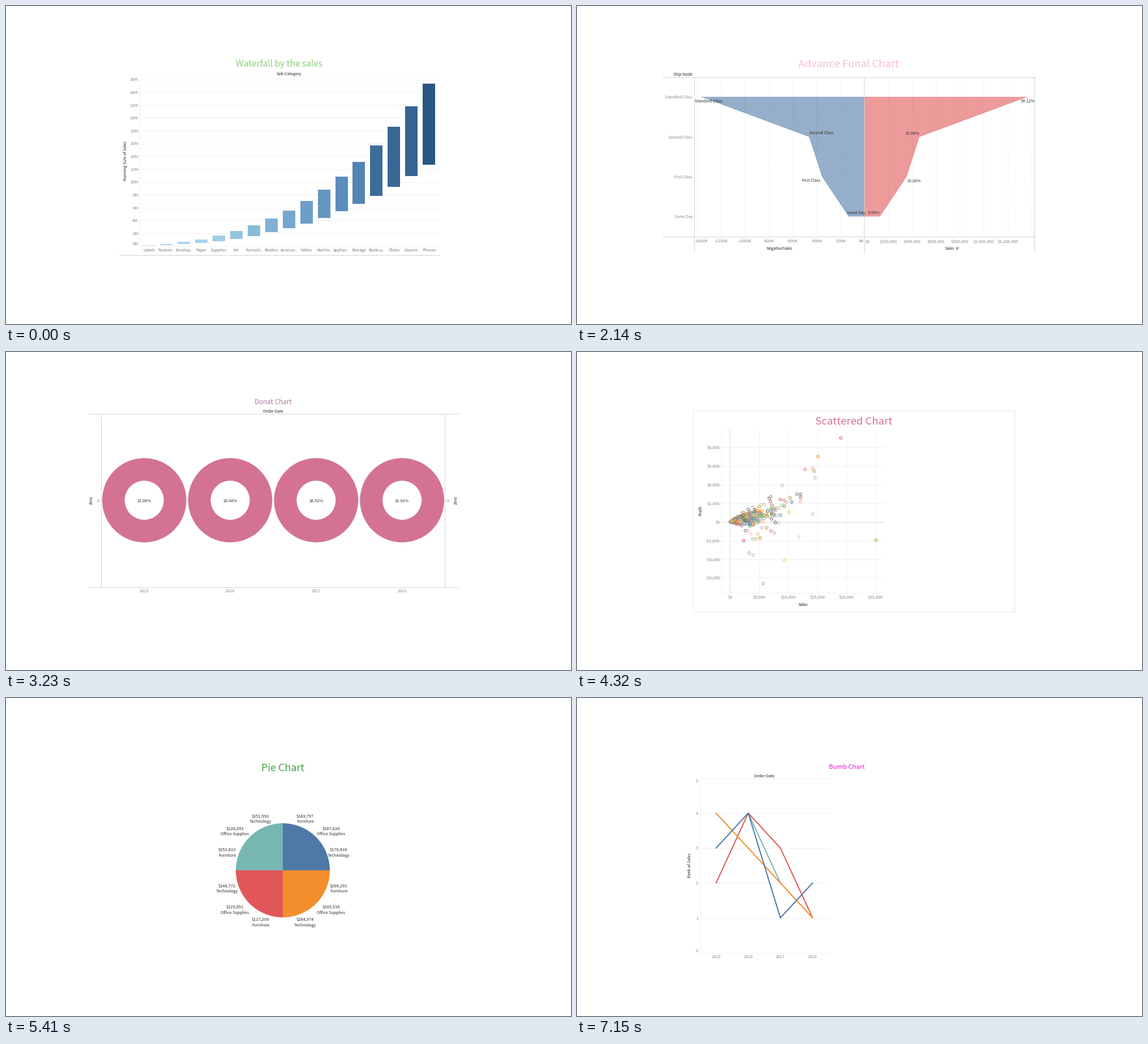
A matplotlib script for the animation above (7.59 s loop, 998 px wide and 561 px high).

```python
import numpy as np
import matplotlib.pyplot as plt
from matplotlib.animation import FuncAnimation
from matplotlib.collections import PatchCollection
from matplotlib.colors import LinearSegmentedColormap
from matplotlib.patches import Circle, Polygon, Rectangle, Wedge

W, H, DPI = 998, 561, 64
INTERVAL, LOOP = 30, 7590
SLIDE, LEAD = 1090, 40  # each slide lasts 1090 ms, the first one is 40 ms shorter

PT = 72 / DPI
DARK, INK, GREY = "#1c1c1c", "#2b2b2b", "#8a8a8a"
GRID, RULE = "#f0f0f0", "#d4d4d4"
PALETTE = dict(
    blue="#4e79a7", sky="#a0cbe8", orange="#f28e2b", peach="#ffbe7d",
    green="#59a14f", lime="#8cd17d", gold="#b6992d", yellow="#f1ce63",
    teal="#499894", mint="#86bcb6", red="#e15759", salmon="#ff9d9a",
    slate="#79706e", stone="#bab0ac", rose="#d37295", blush="#fabfd2",
    plum="#b07aa1", lilac="#d4a6c8", brown="#9d7660", sand="#d7b5a6")
SHADES = list(PALETTE.values())
AQUA = "#76b7b2"

plt.rcParams["font.family"] = ["Noto Sans CJK JP", "DejaVu Sans"]
fig = plt.figure(figsize=(W / DPI, H / DPI), dpi=DPI, facecolor="white")


def new_slide():
    ax = fig.add_axes([0, 0, 1, 1])
    ax.set_xlim(0, W)
    ax.set_ylim(H, 0)
    ax.axis("off")
    return ax


def write(ax, x, y, text, px=7, color=INK, ha="center", weight="normal"):
    """Text whose capitals are centred on y."""
    ax.text(x, y + 0.37 * px, text, size=px * PT, color=color, ha=ha,
            va="baseline", weight=weight, zorder=6)


def write_up(ax, x, y, text, px=7):
    ax.text(x, y, text, size=px * PT, color=DARK, ha="center", va="center",
            rotation=90, weight="medium", zorder=6)


def heading(ax, x, y, text):
    write(ax, x, y, text, 7, DARK, weight="medium")


def tick(ax, x, y, text, ha="center"):
    write(ax, x, y, text, 7.4, GREY, ha)


def line(ax, xs, ys, color=GRID, width=1, z=1, **style):
    ax.plot(xs, ys, color=color, lw=width * PT, zorder=z, **style)


def hline(ax, y, x0, x1, color=GRID, **style):
    line(ax, [x0, x1], [y, y], color, **style)


def vline(ax, x, y0, y1, color=GRID, **style):
    line(ax, [x, x], [y0, y1], color, **style)


def disc(ax, x, y, r, color, z=3):
    ax.add_patch(Circle((x, y), r, color=color, lw=0, zorder=z))


def money(v):
    return f"{'-' if v < 0 else ''}${abs(v):,}"


def waterfall(ax):
    write(ax, 483, 101, "Waterfall by the sales", 15.5, PALETTE["lime"])
    heading(ax, 500, 119, "Sub-Category")
    write_up(ax, 211.5, 273, "Running Sum of Sales", 6.9)
    base, step = 423.7, 22.63
    for i in range(14):
        y = base - i * step
        hline(ax, y, 237, 764)
        tick(ax, 233.5, min(y, 419), f"{2 * i}M", "right")
    vline(ax, 236.5, 129, 424)
    ax.add_patch(Rectangle((200, 438.8), 567, 1.8, color="#e2e7e8", lw=0))

    names = ("Labels Fastene.. Envelop.. Paper Supplies Art Furnishi.. Binders "
             "Accesso.. Tables Machin.. Applian.. Storage Bookca.. Chairs "
             "Copiers Phones").split()
    blues = LinearSegmentedColormap.from_list("blues", [
        (0, "#b9ddf1"), (0.25, "#9fcde9"), (0.5, "#76a7cd"),
        (0.75, "#5485b5"), (0.82, "#3d6a98"), (0.93, "#3a6595"),
        (1, "#2a5783")])
    for i, name in enumerate(names):
        x = 252.3 + 30.93 * i
        rise = np.polyval([0.0319, 0.5075, 1.51, 2.1], i)
        # every bar hangs halfway down to the baseline
        ax.add_patch(Rectangle((x - 11, base - rise), 22, rise / 2,
                               color=blues(i / 16), lw=0, zorder=3))
        write(ax, x, 430.7, name, 6.95, "#787878")


BIG_BUBBLES = [
    ("Philadelphia", 338.5, 224, 31.5, "rose"),
    ("Houston", 461, 197, 24, "yellow"),
    ("Seattle", 585, 212, 32.5, "slate"),
    ("Dallas", 441, 233.5, 13.5, "mint"),
    ("Chicago", 415.5, 256, 21, "blue"),
    ("New York City", 606.7, 312, 47.8, "mint"),
    ("Los Angeles", 337, 350, 39.7, "gold"),
    ("San Francisco", 362.5, 416.7, 31.7, "brown"),
    ("Detroit", 402, 337, 19.5, "peach"),
    ("Newark", 457, 397, 16, "red"),
    ("San Diego", 524, 407.5, 20.5, "lilac"),
    ("", 420.5, 147.5, 19.5, "green"),
    ("", 407, 178, 14, "rose"),
    ("", 518, 280, 18.3, "rose"),
    ("", 546.5, 303.5, 13, "rose"),
    ("", 372, 302, 20, "plum"),
    ("", 442, 310, 13.3, "plum"),
    ("", 503, 214, 15, "blush"),
    ("", 495, 258, 14, "blue"),
    ("", 527.5, 356.5, 12.6, "blue"),
    ("", 363, 270, 12.2, "blue"),
    ("", 485, 302, 12, "sky"),
    ("", 491.5, 337, 15, "stone"),
    ("", 416, 376, 15, "stone"),
    ("", 544, 382, 12, "red"),
    ("", 403.5, 400, 13, "yellow"),
]
PALE_TEXT_ON = {"rose", "slate", "blue", "brown", "red"}


def bubbles(ax):
    write(ax, 475.5, 112.5, "Bubble Chart", 18.4, "#f04fe4")
    hues = []
    for name, x, y, r, hue in BIG_BUBBLES:
        hues.append(PALETTE[hue])
        write(ax, x, y, name, 7, "#f0eeee" if hue in PALE_TEXT_ON else INK)
    placed = np.array([b[1:4] for b in BIG_BUBBLES])

    # pack the round cluster: of many random spots take the tightest fit
    rng = np.random.default_rng(12)
    for size, count in [(9.6, 16), (8, 36), (6.6, 50), (5.3, 70), (4, 90),
                        (3, 110), (2.1, 150), (1.4, 180)]:
        for _ in range(count):
            r = size * rng.uniform(0.9, 1.1)
            d = (129 - r) * np.sqrt(rng.random(300))
            a = rng.random(300) * 2 * np.pi
            x, y = 458 + d * np.cos(a), 290 + d * np.sin(a)
            gap = (np.hypot(x[:, None] - placed[:, 0], y[:, None] - placed[:, 1])
                   - placed[:, 2]).min(axis=1)
            gap[gap < r + 0.15] = np.inf
            best = gap.argmin()
            if np.isfinite(gap[best]):
                placed = np.vstack([placed, (x[best], y[best], r)])
                hues.append(SHADES[rng.integers(20)])
    discs = [Circle((x, y), r) for x, y, r in placed]
    ax.add_collection(PatchCollection(discs, facecolors=hues, linewidths=0,
                                      zorder=3))


def funnel(ax):
    write(ax, 479.5, 101, "Advance Funal Chart", 18.4, PALETTE["blush"])
    write(ax, 204, 120.5, "Ship Mode", 6.9, DARK, "right", "medium")
    left, mid, right, step = 207, 507.5, 808.5, 42.2
    for i in range(1, 8):
        for side in (-1, 1):
            vline(ax, mid + side * i * step, 126, 406, "#00000010",
                  z=4, dashes=(3, 1.5))
        tick(ax, max(mid - i * step, left + 12.3), 414.5, f"-{200 * i}K")
        if i < 7:
            tick(ax, mid + i * step, 414.5, money(200000 * i))
    tick(ax, mid - 0.5, 414.5, "0K", "right")
    tick(ax, mid + 0.7, 414.5, "$0", "left")
    for y in (125.5, 406.5):
        hline(ax, y, 151, 809, RULE)
    for x in (left, mid, right):
        vline(ax, x, 125, 435, RULE, z=5)

    modes = ["Standard Class", "Second Class", "First Class", "Same Day"]
    shares = np.array([59.12, 19.99, 15.30, 5.59])
    reach = 4.855 * shares
    rows = 160.2 + 70.4 * np.arange(4)
    for side, hue in ((-1, "blue"), (1, "red")):
        xs = mid + side * reach
        shape = [(mid, rows[0]), *zip(xs, rows), (mid, rows[-1])]
        ax.add_patch(Polygon(shape, color=PALETTE[hue], alpha=0.6, lw=0,
                             zorder=3))
        line(ax, xs, rows, PALETTE[hue], 0.8, 3, alpha=0.6)
        # notes alternate: below and outside, then above and inside
        lo, hi = (left, mid) if side < 0 else (mid, right)
        for i, (x, y) in enumerate(zip(xs, rows)):
            note = modes[i] if side < 0 else f"{shares[i]:.2f}%"
            half = (1.78 if side < 0 else 2.1) * len(note)
            out = 1 if i % 2 == 0 else -1
            x = np.clip(x + side * out * half, lo + half, hi - half)
            write(ax, x, y + out * 6.8, note, 7 if side < 0 else 7.3)
    for name, y in zip(modes, rows):
        write(ax, 204, y + 0.5, name, 7, GREY, "right")

    heading(ax, 357.3, 427.7, "NegativeSales")
    heading(ax, 658, 427.7, "Sales")
    vline(ax, 670.5, 425, 430, "#777777")
    for y, end in ((425.5, 674.5), (427.5, 673)):
        hline(ax, y, 670, end, "#777777")


def donuts(ax):
    write(ax, 472, 88, "Donat Chart", 11.6, PALETTE["plum"])
    heading(ax, 472, 104.5, "Order Date")
    hline(ax, 261.5, 165, 779, "#e2e2e2")
    for y in (109, 415):
        hline(ax, y, 145, 799, RULE)
    for x, zero, name in ((168.5, 163, 150.8), (775.5, 781, 794.3)):
        vline(ax, x, 109, 415, RULE)
        tick(ax, zero, 262, "0")
        write_up(ax, name, 261, "Zero")
    for i, share in enumerate([21.08, 20.48, 26.52, 31.92]):
        x = 244.2 + 151.8 * i
        disc(ax, x, 261.5, 74.3, PALETTE["rose"])
        disc(ax, x, 261.5, 34.5, "white", 4)
        write(ax, x, 262, f"{share:.2f}%", 7.3)
        tick(ax, x, 421.5, str(2015 + i))


def scatter(ax):
    ax.add_patch(Rectangle((205.5, 102.5), 568, 355, fill=False, lw=PT,
                           ec="#dedede", ls=(0, (2, 1))))
    write(ax, 489, 121.5, "Scattered Chart", 18.5, PALETTE["rose"])
    zero_x, zero_y = 270.5, 299.7
    for i in range(6):
        x = zero_x + 51.37 * i
        vline(ax, x, 136, 424, GRID if i else "#dcdcdc")
        tick(ax, x, 432, money(5000 * i))
    for v in range(-6000, 9000, 2000):
        y = zero_y - v * 0.01645
        hline(ax, y, 255, 543, GRID if v else "#dcdcdc")
        tick(ax, 252.5, y, money(v), "right")
    vline(ax, 255.5, 136, 424)
    hline(ax, 424.5, 255, 543)
    heading(ax, 399, 445, "Sales")
    write_up(ax, 218, 280, "Profit")

    # a cone of small orders that opens up from the origin
    rng = np.random.default_rng(4)
    run = rng.exponential(19, 720)
    run = run[run < 105]
    rise = np.clip(rng.normal(0.22, 0.19, run.size), -0.4, 0.66)
    wobble = rng.normal(0, 1.8, run.size) * np.minimum(1, run / 10)
    # a thin spray of larger orders, some of them at a loss
    far = rng.uniform(68, 126, 16)
    loss = rng.uniform(22, 90, 10)
    xs = zero_x + np.concatenate([run, far, loss])
    ys = zero_y - np.concatenate([run * rise + wobble,
                                  far * rng.normal(0.32, 0.08, 16),
                                  -rng.uniform(14, 36, 10)])
    hues = [SHADES[k] for k in rng.integers(0, 20, xs.size)]

    extremes = [(466, 151.5, "red"), (425.5, 184.5, "orange"),
                (403, 207, "rose"), (416, 205, "salmon"), (419, 210, "gold"),
                (420.5, 222, "lilac"), (362.5, 235.5, "lilac"),
                (416, 286, "sky"), (391.5, 326.5, "blush"),
                (528, 332, "gold"), (367, 367, "yellow"),
                (329, 408.5, "lime"), (311, 358.5, "lilac"),
                (304, 354.5, "mint")]
    ex, ey, names = zip(*extremes)
    ax.scatter([*xs, *ex], [*ys, *ey], s=(4.6 * PT) ** 2, facecolors="none",
               edgecolors=hues + [PALETTE[n] for n in names],
               linewidths=1.05 * PT, zorder=3)


def pie(ax):
    write(ax, 489, 122.5, "Pie Chart", 17.9, "#4ba04a")
    cx, cy = 489, 304
    # quarters run clockwise from the top, each with three labels
    quarters = [("#4e79a7", 1, -1, (163797, 167026, 170416)),
                ("#f28e2b", 1, 1, (208291, 205516, 264974)),
                ("#e15759", -1, 1, (117299, 125651, 148772)),
                (AQUA, -1, -1, (252613, 220853, 251992))]
    kinds = ["Furniture", "Office Supplies", "Technology"]
    offsets = [(39.5, 91.3), (85, 69.3), (98.5, 31.7)]
    for i, (hue, sx, sy, totals) in enumerate(quarters):
        ax.add_patch(Wedge((cx, cy), 83, 270 + 90 * i, 360 + 90 * i,
                           color=hue, lw=0, zorder=3))
        spots = offsets[::-1] if i % 2 else offsets
        for (dx, dy), total, kind in zip(spots, totals, kinds):
            x, y = cx + sx * dx, cy + sy * dy
            write(ax, x, y - 5, money(total), 7.5)
            write(ax, x, y + 5, kind, 7.2)


def bump(ax):
    write(ax, 476.5, 120.5, "Bumb Chart", 11.3, "#f50fd0")
    heading(ax, 331, 137, "Order Date")
    write_up(ax, 199.5, 295, "Rank of Sales")
    base, step = 449.5, 61.6
    for rank in range(6):
        y = base - rank * step
        hline(ax, y, 217, 445)
        tick(ax, 214, np.clip(y, 146, 445), str(rank), "right")
    vline(ax, 217.5, 141, 449)
    xs = 245.7 + 56.8 * np.arange(4)
    for x, year in zip(xs, range(2015, 2019)):
        tick(ax, x, 456.5, str(year))
    for hue, first, ranks in [(AQUA, 1, [4, 2]),
                              ("#e15759", 0, [2, 4, 3, 1]),
                              ("#f28e2b", 0, [4, 3, 2, 1]),
                              ("#4e79a7", 0, [3, 4, 1, 2])]:
        line(ax, xs[first:first + len(ranks)], base - step * np.array(ranks),
             hue, 2, 3, solid_capstyle="round", solid_joinstyle="round")


slides = []
for build in (waterfall, bubbles, funnel, donuts, scatter, pie, bump):
    slides.append(new_slide())
    build(slides[-1])


def update(n):
    current = (n * INTERVAL + INTERVAL - 1 + LEAD) // SLIDE
    for i, ax in enumerate(slides):
        ax.set_visible(i == current)
    return slides


anim = FuncAnimation(fig, update, frames=LOOP // INTERVAL, interval=INTERVAL,
                     repeat=True, repeat_delay=0, blit=False)
plt.show()
```
